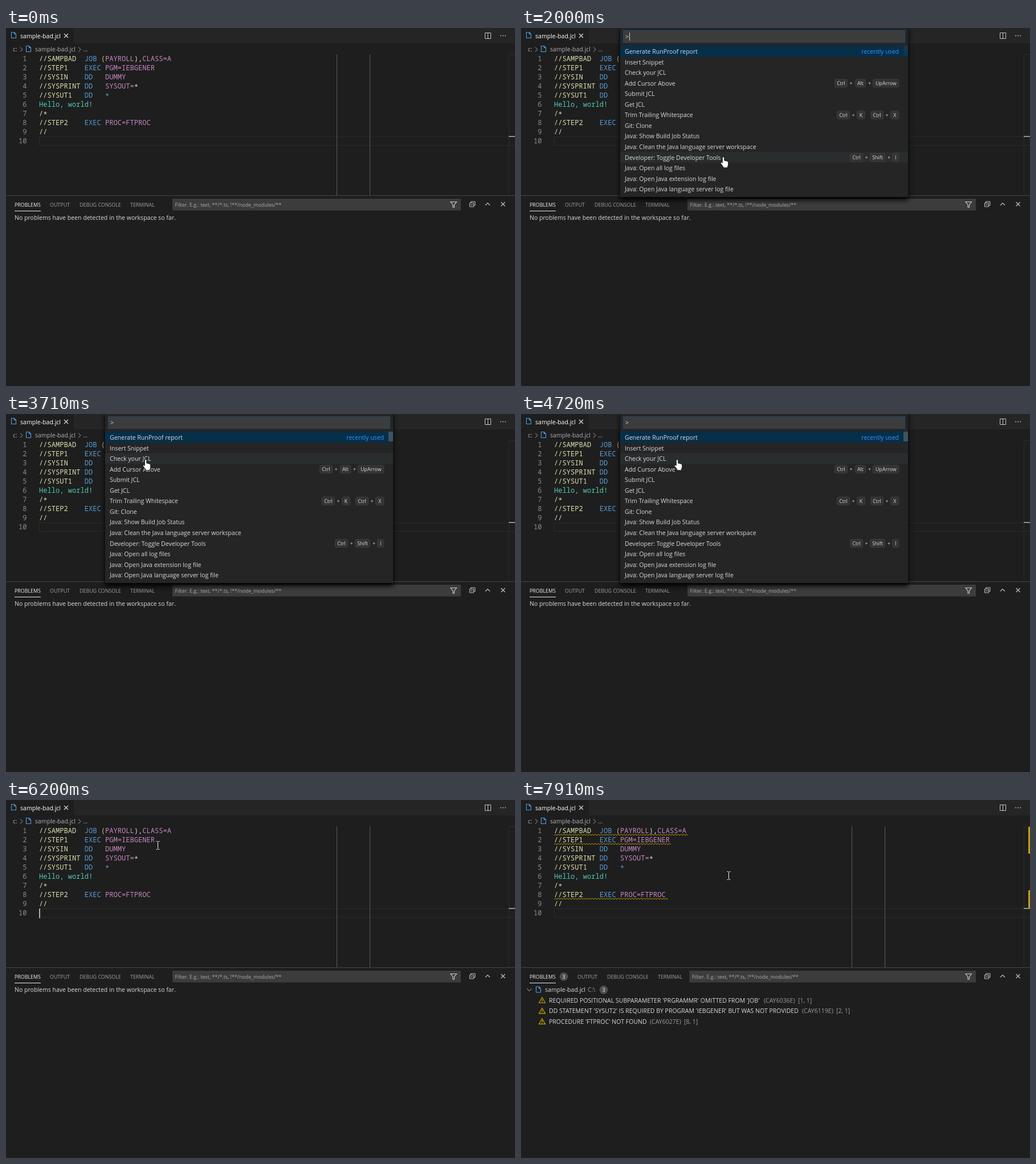
An HTML page for the animation above (7.99 s loop, 893 by 627 pixels).

```html
<!DOCTYPE html>
<html lang="en">
<head>
<meta charset="utf-8">
<title>Code editor</title>
<style>
html, body { margin: 0; height: 100%; overflow: hidden; background: #1e1e1e; }
svg { display: block; }
text { font: 10.54px "Open Sans", "Noto Sans", sans-serif; white-space: pre; }
text.s { font-size: 8.9px; }
text.m { font: 12.08px "Noto Sans Mono", monospace; }
.menu { filter: drop-shadow(0 5px 4px #000); }
</style>
</head>
<body>
<svg id="stage" width="893" height="627" viewBox="0 0 893 627"></svg>
<script>
const LOOP = 7990, MENU = [2000, 6130], REPORT = 7450;
const ROW = 18.55, TOP = 31.7, PLAIN = "#dadada";

// [time, x, y] of the pointer's hot spot
const PATH = [
  [70, 744, 555], [220, 680, 480], [450, 460, 330], [650, 332, 232], [700, 330, 227],
  [830, 356, 226], [900, 356, 226], [910, 362, 230], [980, 355, 226], [2790, 355, 226],
  [3320, 248, 84], [3400, 248, 84], [3540, 255, 85], [3700, 245, 80], [3860, 252, 80],
  [4040, 252, 80], [4170, 256, 80], [4270, 256, 80], [4460, 278, 80], [4590, 278, 80],
  [4780, 271, 80], [4980, 271, 80], [5180, 268, 80], [5360, 268, 80], [5715, 261, 80],
  [5800, 264, 80], [5890, 264, 80], [5950, 267, 80], [6930, 267, 80], [7200, 300, 95],
  [7750, 366, 128], [7820, 366, 128], [7885, 365, 133]
];
// Times at which each caret flips, starting from hidden
const EDIT_CARET = [910, 1390, 1930, 2000, 6200, 6740, 7240, 7740];
const MENU_CARET = [2000, 2470, 2990, 3480, 4100, 4640, 5120, 5640];

const rect = (x, y, w, h, fill, more = "") =>
  `<rect x="${x}" y="${y}" width="${w}" height="${h}" fill="${fill}" ${more}/>`;
const text = (x, y, s, fill = PLAIN, cls = "", anchor = "start") =>
  `<text x="${x}" y="${y}" fill="${fill}" class="${cls}" text-anchor="${anchor}">${s}</text>`;
const line = (d, stroke = "#c5c5c5", w = 1) =>
  `<path d="${d}" fill="none" stroke="${stroke}" stroke-width="${w}"/>`;
const group = (id, body, cls = "") => `<g id="${id}" class="${cls}">${body}</g>`;
const fileIcon = (x, y) =>
  line(`M${x + .5} ${y + .5}h5l3 3v7h-8zM${x + 5.5} ${y + .5}v3h3`, "#4d9fe0", 1.1);
const cross = (x, y, c) => line(`M${x - 3.5} ${y - 3.5}l7 7m0-7l-7 7`, c, 1.1);
const badge = (x, y) =>
  `<circle cx="${x}" cy="${y}" r="7.4" fill="#4d4d4d"/>` + text(x, y + 3.3, "3", "#fff", "s", "middle");

// Code: each part is a colour letter followed by its text
const INK = { y: "#dcdcaa", b: "#569cd6", p: "#c586c0", g: "#4ec9b0", w: "#d4d4d4", o: "#d7ba7d" };
const CODE = [
  "y//SAMPBAD  |bJOB |o(|pPAYROLL|w),|pCLASS=A",
  "y//STEP1    |bEXEC |pPGM=IEBGENER",
  "y//SYSIN    |bDD   |pDUMMY",
  "y//SYSPRINT |bDD   |pSYSOUT=|w*",
  "y//SYSUT1   |bDD   |b*",
  "gHello, world!",
  "y/*",
  "y//STEP2    |bEXEC |pPROC=FTPROC",
  "y//",
  "w"
];
const codeLine = (src, i) => {
  const y = 58 + 16 * i;
  const parts = src.split("|").map(p => `<tspan fill="${INK[p[0]]}">${p.slice(1)}</tspan>`);
  const body = parts.join("").replace("*", '<tspan dy="2.3">*</tspan>');  // asterisk at mid height
  return text(36.5, y, i + 1, "#8c8c8c", "m", "end") + text(58, y, body, PLAIN, "m");
};
const squiggle = (row, cols) => {
  let d = `M58 ${62 + 16 * row}`;
  for (let i = 0; i < cols * 7.25 / 5; i++) d += "l2.5-2l2.5 2";
  return line(d, "#cca700", .9);
};

const editor = () =>
  rect(0, 0, 893, 27, "#252526") + rect(0, 0, 119, 27, "#1e1e1e") +
  fileIcon(9, 7) + text(25, 17.5, "sample-bad.jcl", "#fff") + cross(105.5, 13.5, "#e0e0e0") +
  line("M840.5 8.5h10v10h-10zM845.5 8.5v10") +
  [868, 872, 876].map(x => rect(x - .8, 12.7, 1.6, 1.6, "#c5c5c5")).join("") +
  text(12, 41, "c:", "#b0b0b0") + line("M25 33.5l4 4-4 4", "#a9a9a9") + fileIcon(35, 31) +
  text(51, 41, "sample-bad.jcl", "#b0b0b0") + line("M127 33.5l4 4-4 4", "#a9a9a9") +
  text(135, 41, "...", "#b0b0b0") +
  rect(58.5, 190.5, 840, 15, "none", 'stroke="#2a2a2a"') +
  line("M580.5 46V293M638.5 46V293", "#5a5a5a") + line("M882.5 293V46.5H893", "#2d2d2d") +
  CODE.map(codeLine).join("");

const tabs = (shift, x) =>
  [["OUTPUT", 77], ["DEBUG CONSOLE", 129], ["TERMINAL", 218]]
    .map(([s, at]) => text(at + shift, 312.5, s, "#a2a2a2", "s")).join("") +
  rect(x, 299, 798 - x, 20.5, "#3c3c3c") +
  text(x + 4.5, 313.3, "Filter. E.g.: text, **/*.ts, !**/node_modules/**", "#acacac", "s") +
  line("M780 304.5h10.5l-4 5v4.5h-2.5v-4.5z", "#d0d0d0", 1.1);

const panel = () =>
  line("M0 293.5H893", "#444") + text(15, 312.5, "PROBLEMS", "#f0f0f0", "s") +
  rect(15, 320, 46, 1, "#e7e7e7") +
  line("M815.5 306.5v-2.5h7.5v6.5h-2.5M813.5 306.5h7v6.5h-7zM815 309.7h4") +
  line("M841 310.5l4-4 4 4", "#c5c5c5", 1.1) + cross(872, 308.5, "#c5c5c5");

const problem = ([s, code, x, pos], i) => {
  const y = 350.8 + 18.55 * i;
  return line(`M37 ${y - 5}l5.5 9.5h-11zM37 ${y - 1.8}v3.4M37 ${y + 2.3}v1.2`, "#cca700", 1.1) +
    text(49, y + 4, s) + text(x, y + 4, code, "#9c9c9c") + text(x + 60, y + 4, pos, "#9c9c9c");
};
const report = () =>
  tabs(22, 295.5) + badge(75, 309.3) +
  line("M10.5 330.5l4 4 4-4") + fileIcon(26, 326.5) +
  text(42, 336, "sample-bad.jcl") + text(117, 336, "C:\\", "#9c9c9c") + badge(145, 332.5) +
  [
    ["REQUIRED POSITIONAL SUBPARAMETER 'PRGRAMMR' OMITTED FROM 'JOB'", "(CAY6036E)", 426, "[1, 1]"],
    ["DD STATEMENT 'SYSUT2' IS REQUIRED BY PROGRAM 'IEBGENER' BUT WAS NOT PROVIDED", "(CAY6119E)", 493, "[2, 1]"],
    ["PROCEDURE 'FTPROC' NOT FOUND", "(CAY6027E)", 226, "[8, 1]"]
  ].map(problem).join("") +
  squiggle(0, 32) + squiggle(1, 28) + squiggle(7, 27) +
  rect(890, 47, 3, 47, "#c19e0c") + rect(890, 158, 3, 32, "#c19e0c");

const COMMANDS = [
  "Generate RunProof report", "Insert Snippet", "Check your JCL", "Add Cursor Above",
  "Submit JCL", "Get JCL", "Trim Trailing Whitespace", "Git: Clone",
  "Java: Show Build Job Status", "Java: Clean the Java language server workspace",
  "Developer: Toggle Developer Tools", "Java: Open all log files",
  "Java: Open Java extension log file", "Java: Open Java language server log file"
];
// Key caps: [row, x, width, label]; width 0 is a bare sign centred on x
const KEYS = [
  [3, 550, 23, "Ctrl"], [3, 579, 0, "+"], [3, 586, 19, "Alt"], [3, 611.5, 0, "+"], [3, 617, 46.5, "UpArrow"],
  [6, 554, 23, "Ctrl"], [6, 583, 0, "+"], [6, 589, 15, "K"],
  [6, 613, 23, "Ctrl"], [6, 642, 0, "+"], [6, 648, 15.5, "X"],
  [10, 577, 23, "Ctrl"], [10, 606, 0, "+"], [10, 612, 27, "Shift"], [10, 645.5, 0, "+"], [10, 651, 12.5, "I"]
];
const middle = i => 41 + ROW * i;
const keyCap = ([row, x, w, s]) => {
  const y = middle(row);
  return (w ? rect(x + .5, y - 7, w - 1, 14, "#333335", 'rx="2.5" stroke="#3d3d3f"') : "") +
    text(x + w / 2, y + 3.2, s, PLAIN, "s", "middle");
};
const menu = () =>
  rect(174, -5, 505, 301, "#252526", 'class="menu"') +
  rect(179.5, 4.5, 494, 21, "#3c3c3c", 'stroke="#164a70"') + text(183, 19, "&gt;") +
  rect(174, TOP, 505, ROW, "#062f4a") +
  group("hover", rect(174, TOP, 505, ROW, "#2a2d2e")) +
  COMMANDS.map((s, i) => text(182, middle(i) + 4, s)).join("") +
  text(663, 45, "recently used", "#3794ff", "", "end") +
  KEYS.map(keyCap).join("") +
  group("bar", rect(671, 31, 8, 17, "#797979", 'fill-opacity=".5"')) +
  group("menuCaret", rect(190, 8, 1, 14, "#d0d0d0"));

const SHAPES = {
  beam: line("M-3-7h2l1 1 1-1h2M0-6v12M-3 7h2l1-1 1 1h2", "#f0f0f0"),
  hand: '<path d="M-1.7 1.5a1.7 1.7 0 0 1 3.4 0V6l5.2 1.3q1.8.5 1.8 2.4v3q0 2-1.2 3.6v2.4H-.3v-2l-4-5q-1.2-2 .5-2.5 1-.2 2.1 1.3z" fill="#fff" stroke="#111" stroke-width=".9"/>',
  arrow: '<path d="M0 0V16l3.7-3.5 2.4 5.7 2.5-1-2.4-5.6H11.5z" fill="#fff" stroke="#111" stroke-width=".9"/>'
};

document.getElementById("stage").innerHTML =
  editor() + panel() +
  group("clean", tabs(0, 292) + text(15, 336, "No problems have been detected in the workspace so far.")) +
  group("report", report()) + rect(882, 189, 11, 2, "#8f8f86") +
  group("editCaret", rect(58, 190, 2, 17, "#aeafad")) +
  group("menu", menu()) +
  group("pointer", Object.keys(SHAPES).map(k => group(k, SHAPES[k])).join(""));

const el = id => document.getElementById(id);
const show = (id, on) => el(id).style.display = on ? "" : "none";
const flipped = (times, t) => times.filter(x => x <= t).length % 2 === 1;

function pointerAt(t) {
  const q = 62 + Math.floor((t - 62) / 77.5) * 77.5;  // the pointer moves in steps
  const i = PATH.findIndex(p => p[0] > q);
  if (i < 0) return PATH[PATH.length - 1].slice(1);
  if (i === 0) return PATH[0].slice(1);
  const a = PATH[i - 1], b = PATH[i], k = (q - a[0]) / (b[0] - a[0]);
  return [1, 2].map(n => Math.round(a[n] + (b[n] - a[n]) * k));
}

function draw(t) {
  const open = t >= MENU[0] && t < MENU[1];
  const [x, y] = pointerAt(t);
  const kind = open ? "hand" : y < 293 ? "beam" : "arrow";
  show("menu", open);
  show("clean", t < REPORT);
  show("report", t >= REPORT);
  show("editCaret", flipped(EDIT_CARET, t));
  show("menuCaret", flipped(MENU_CARET, t));
  el("bar").style.opacity = t < 2080 ? .2 : 1;
  const row = Math.floor((y - TOP) / ROW);
  show("hover", row > 0);
  el("hover").setAttribute("transform", `translate(0 ${row * ROW})`);
  show("pointer", t >= 70);
  for (const k in SHAPES) show(k, k === kind);
  const half = kind === "beam" ? .5 : 0;
  el("pointer").setAttribute("transform", `translate(${x - half} ${y - half})`);
}

const start = performance.now();
function tick() {
  draw((performance.now() - start + 3) % LOOP);
  requestAnimationFrame(tick);
}
tick();
</script>
</body>
</html>
```
